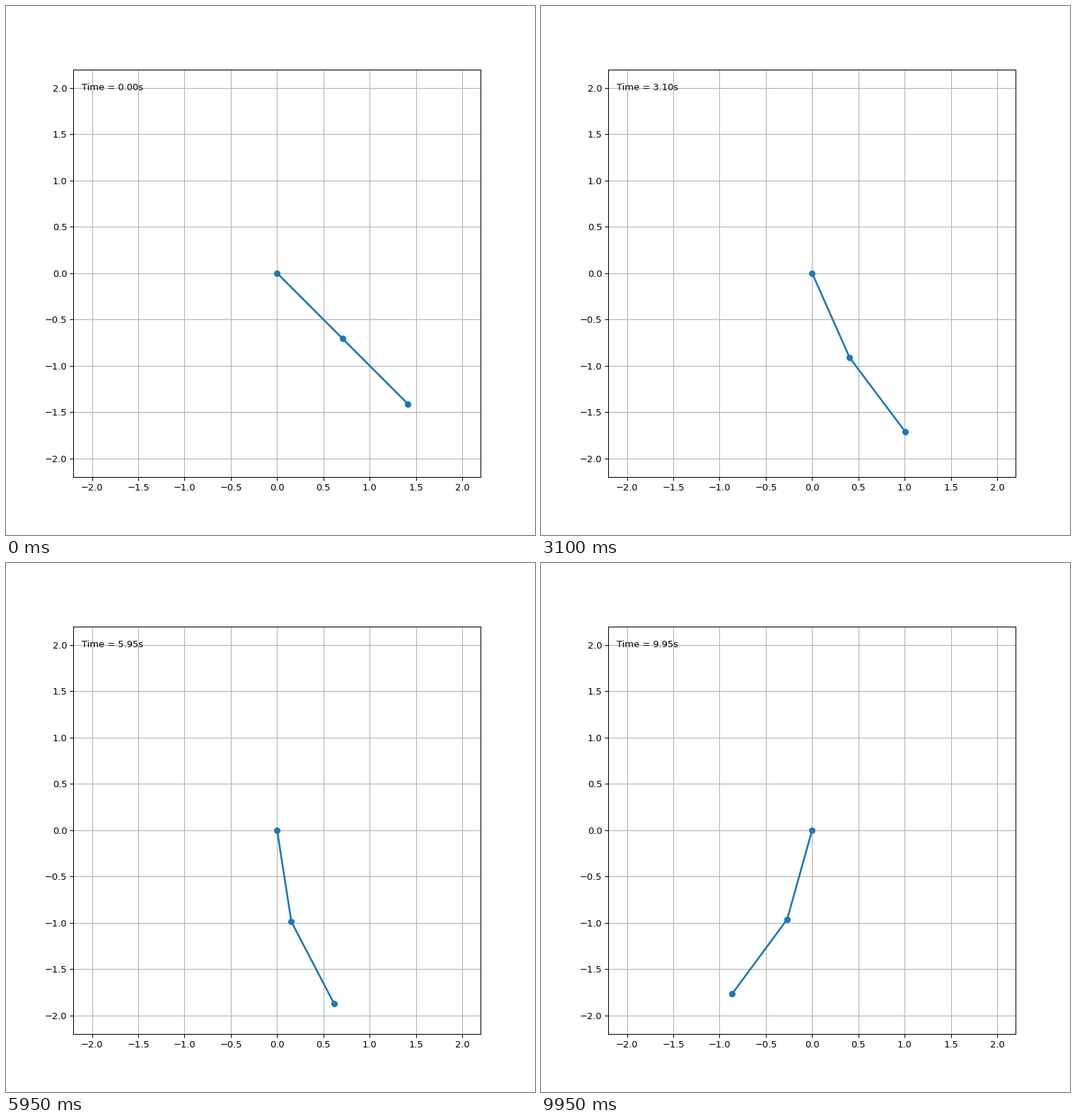
Write a matplotlib script that moves like this. It is 748x748 px and loops after 10 s.

```python
import numpy as np
import matplotlib.pyplot as plt
from matplotlib.animation import FuncAnimation

G = 9.81
DT = 0.05
FRAMES = 200
SUBSTEPS = 20


def derivs(state):
    """Double pendulum with unit masses and unit rods."""
    a1, w1, a2, w2 = state
    d = a2 - a1
    s, c = np.sin(d), np.cos(d)
    den = 2 - c * c
    acc1 = (w1 * w1 * s * c + G * np.sin(a2) * c + w2 * w2 * s
            - 2 * G * np.sin(a1)) / den
    acc2 = (-w2 * w2 * s * c + 2 * (G * np.sin(a1) * c - w1 * w1 * s
            - G * np.sin(a2))) / den
    return np.array([w1, acc1, w2, acc2])


def rk4(state, h):
    k1 = derivs(state)
    k2 = derivs(state + h / 2 * k1)
    k3 = derivs(state + h / 2 * k2)
    k4 = derivs(state + h * k3)
    return state + h / 6 * (k1 + 2 * k2 + 2 * k3 + k4)


def simulate():
    state = np.array([np.pi / 4, 0, np.pi / 4, 0])
    angles = []
    for _ in range(FRAMES):
        angles.append((state[0], state[2]))
        for _ in range(SUBSTEPS):
            state = rk4(state, DT / SUBSTEPS)
    return np.array(angles)


angles = simulate()
xs = np.cumsum(np.sin(angles), axis=1)
ys = -np.cumsum(np.cos(angles), axis=1)

fig, ax = plt.subplots(figsize=(8, 8), dpi=93.5)
ax.set_xlim(-2.2, 2.2)
ax.set_ylim(-2.2, 2.2)
ax.set_aspect("equal")
ax.grid()
rods, = ax.plot([], [], "o-", lw=2)
clock = ax.text(0.02, 0.95, "", transform=ax.transAxes)


def update(i):
    rods.set_data([0, *xs[i]], [0, *ys[i]])
    clock.set_text(f"Time = {i * DT:.2f}s")
    return rods, clock


anim = FuncAnimation(fig, update, frames=FRAMES, interval=50,
                     repeat=True, repeat_delay=0)
plt.show()
```
